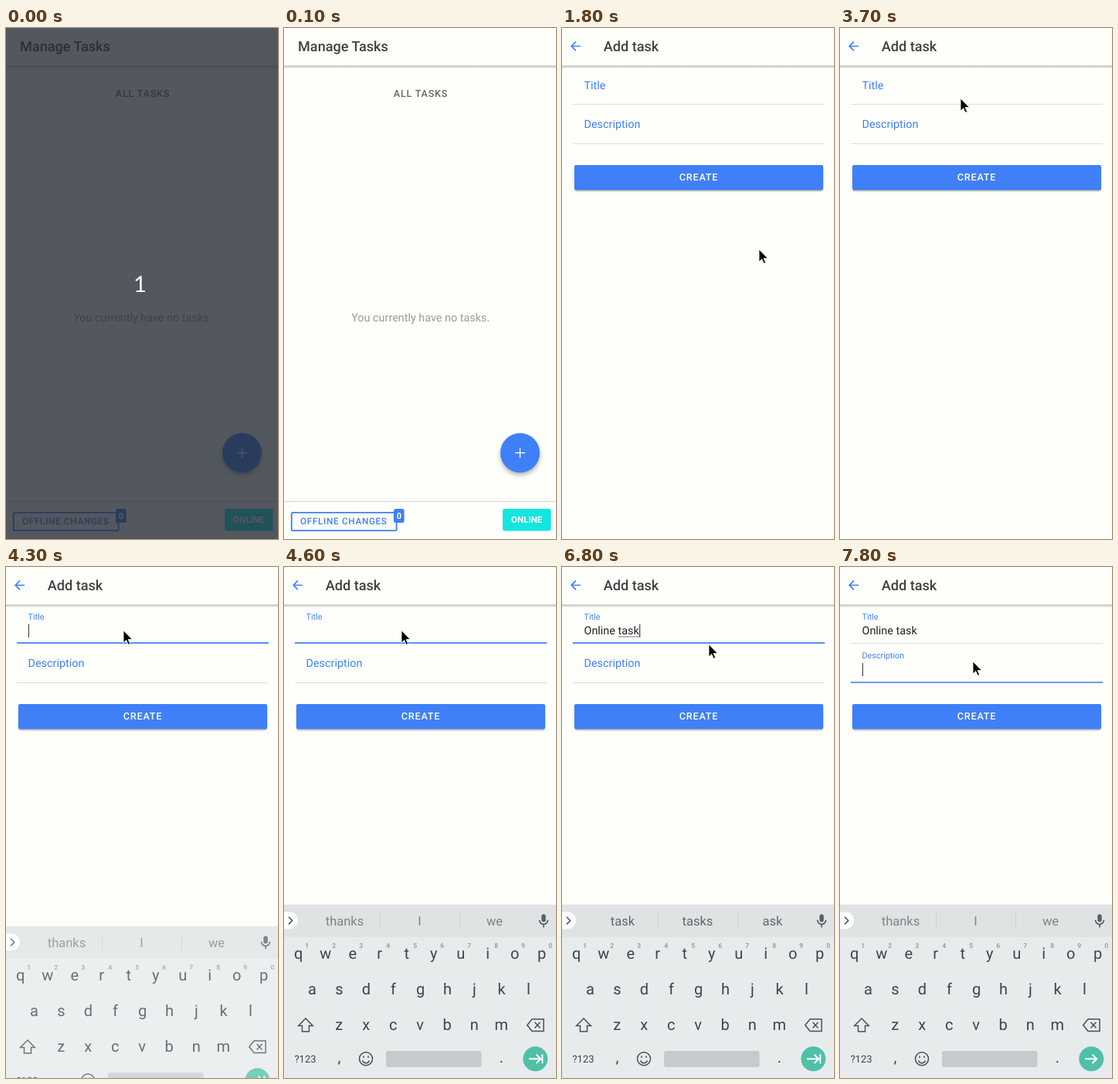
Recreate the animation shown at these times as an HTML page. Size 352x660 px, loop 8000 ms.

```html
<!DOCTYPE html>
<html lang="en">
<head>
<meta charset="utf-8">
<title>Manage Tasks</title>
<style>
  html, body { margin: 0; width: 100%; height: 100%; overflow: hidden; background: #fefffb; }
  svg { display: block; width: 352px; height: 660px; font-family: Roboto, sans-serif; text-rendering: geometricPrecision; }
  text { white-space: pre; }
  .mid { text-anchor: middle; }
  .blue { fill: #3f80f8; }
  .white { fill: #fff; }
  .line { fill: none; stroke: #3f80f8; }
  .heading { font-size: 18.1px; font-weight: 500; fill: #424242; }
  .caps { font-size: 12.6px; font-weight: 500; letter-spacing: .8px; }
  .field { font-size: 14.4px; }
  .icon { fill: none; stroke: #455157; stroke-width: 1.5; }
  .key { font-size: 20px; fill: #37474f; }
  .hint { font-size: 8.5px; font-weight: 500; fill: #8a9397; }
  .word { font-size: 16.5px; fill: #5c666a; }
  .idle .word { fill: #7d8487; }

  /* One loop is 8 s, so 100 ms is 1.25 %. */
  #cover, #form, #keyboard, #mouse, .label, .focus { animation: 8s step-end infinite; }
  #cover { animation-name: cover; }
  #form { animation-name: enter; }
  #keyboard { animation-name: rise; }
  #mouse { animation-name: point; }
  #title .label { animation-name: floatTitle; }
  #title .focus { animation-name: focusTitle; }
  #desc .label { animation-name: floatDesc; }
  #desc .focus { animation-name: focusDesc; }

  @keyframes cover { 0% { opacity: 1 } 1.25%, 100% { opacity: 0 } }
  @keyframes enter {
    0% { opacity: 0; transform: translateY(40px) }
    17.5% { opacity: .05; transform: translateY(38px) }
    18.75% { opacity: .45; transform: translateY(20px) }
    20% { opacity: .85; transform: translateY(5px) }
    21.25% { opacity: .98; transform: translateY(1px) }
    22.5%, 100% { opacity: 1; transform: none }
  }
  @keyframes rise {
    0% { opacity: 0; transform: translateY(224px) }
    52.5% { opacity: .4; transform: translateY(100px) }
    53.75% { opacity: .78; transform: translateY(28px) }
    55% { opacity: .95; transform: translateY(6px) }
    56.25%, 100% { opacity: 1; transform: none }
  }
  @keyframes floatTitle {
    0% { transform: none }
    50% { transform: translateY(-6px) scale(.87) }
    51.25%, 100% { transform: translateY(-11px) scale(.75) }
  }
  @keyframes floatDesc {
    0% { transform: none }
    91.25% { transform: translateY(-6px) scale(.87) }
    92.5%, 100% { transform: translateY(-11px) scale(.75) }
  }
  @keyframes focusTitle { 0%, 91.25%, 100% { opacity: 0 } 50% { opacity: 1 } }
  @keyframes focusDesc { 0% { opacity: 0 } 91.25%, 100% { opacity: 1 } }
  @keyframes point {
    0% { opacity: 0; transform: translate(309px, 432px) }
    3.75% { opacity: 1; transform: translate(309px, 432px) }
    5% { transform: translate(268px, 505px) }
    6.25% { transform: translate(235px, 565px) }
    7.5% { transform: translate(249px, 587px) }
    10% { transform: translate(258px, 580px) }
    11.25% { transform: translate(272px, 566px) }
    12.5% { transform: translate(284px, 553px) }
    15% { transform: translate(296px, 548px) }
    18.75% { transform: translate(292px, 520px) }
    20% { transform: translate(280px, 430px) }
    21.25% { transform: translate(265px, 330px) }
    22.5% { transform: translate(255px, 286px) }
    36.25% { transform: translate(290px, 235px) }
    37.5% { transform: translate(336px, 150px) }
    38.75% { transform: translate(318px, 60px) }
    40% { transform: translate(255px, 7px) }
    41.25% { transform: translate(200px, 20px) }
    42.5% { transform: translate(167px, 64px) }
    43.75% { transform: translate(156px, 97px) }
    46.25% { transform: translate(156px, 91px) }
    47.5% { transform: translate(152px, 82px) }
    85% { transform: translate(190px, 100px) }
    86.25% { transform: translate(212px, 118px) }
    88.75% { transform: translate(190px, 122px) }
    90%, 100% { opacity: 1; transform: translate(172px, 122px) }
  }
</style>
</head>
<body>
<svg viewBox="0 0 352 660">
  <defs>
    <linearGradient id="edge" x2="0" y2="1">
      <stop stop-color="#bbb"/><stop offset="1" stop-color="#bbb" stop-opacity="0"/>
    </linearGradient>
    <filter id="soft" x="-50%" y="-50%" width="200%" height="200%"><feGaussianBlur stdDeviation="3"/></filter>
    <filter id="tight" x="-5%" y="-20%" width="110%" height="150%"><feGaussianBlur stdDeviation="1"/></filter>
    <g id="bar">
      <rect width="352" height="660" fill="#fefffb"/>
      <rect y="48.5" width="352" height="4" fill="url(#edge)"/>
    </g>
  </defs>

  <g id="list">
    <use href="#bar"/>
    <text class="heading" x="18" y="29.5">Manage Tasks</text>
    <text class="caps mid" x="177" y="89" fill="#666">ALL TASKS</text>
    <text class="field mid" x="176.7" y="378.7" fill="#999">You currently have no tasks.</text>
    <circle cx="305.5" cy="552" r="25" opacity=".35" filter="url(#soft)"/>
    <circle class="blue" cx="305.5" cy="548.7" r="25.5"/>
    <path d="M299 548.7h13M305.5 542.2v13" stroke="#fff" stroke-width="1.3"/>
    <path d="M0 611.5h352" stroke="#dcdddb" stroke-width="1.6"/>
    <rect class="line" x="9.8" y="625.8" width="135.8" height="23.4" rx="2" stroke-width="1.8"/>
    <text class="blue" x="21" y="641" font-size="11.7" font-weight="500" letter-spacing=".7">OFFLINE CHANGES</text>
    <rect class="blue" x="142" y="621" width="13.6" height="18" rx="2.5"/>
    <text class="white mid" x="148.8" y="634" font-size="11" font-weight="700">0</text>
    <rect x="283" y="621" width="62.5" height="28.5" rx="3" fill="#12e6df"/>
    <text class="white mid" x="314.2" y="639" font-size="11.5" font-weight="700">ONLINE</text>
  </g>

  <g id="form">
    <use href="#bar"/>
    <path class="line" d="M24 23.5H12.5M18 17.7l-5.8 5.8 5.8 5.8" stroke-width="1.7"/>
    <text class="heading" x="53.7" y="29.5">Add task</text>
    <g id="title">
      <path d="M14 98.5h326" stroke="#dededc"/>
      <path class="line focus" d="M14 98.2h326" stroke-width="1.7"/>
      <g transform="translate(28.5 79)"><text class="field blue label">Title</text></g>
      <text id="typed" class="field" x="28.5" y="87" fill="#222"></text>
      <rect id="compose" y="89.5" height="1" fill="#777"/>
    </g>
    <g id="desc">
      <path d="M14 149.5h326" stroke="#dededc"/>
      <path class="line focus" d="M14 149h326" stroke-width="1.7"/>
      <g transform="translate(28.5 129.2)"><text class="field blue label">Description</text></g>
    </g>
    <rect id="caret" width="1.2" height="17" fill="#444"/>
    <rect x="16.5" y="179" width="321" height="31.5" rx="2" opacity=".4" filter="url(#tight)"/>
    <rect class="blue" x="16" y="177" width="322" height="32.3" rx="2"/>
    <text class="caps white mid" x="177" y="197">CREATE</text>
  </g>

  <g id="keyboard">
    <rect y="436" width="352" height="224" fill="#e7ebec"/>
    <rect y="436" width="352" height="42" fill="#dfe3e4"/>
    <path d="M124.5 446v22M227.5 446v22" stroke="#cdd2d4"/>
    <rect x="-12" y="445.5" width="30" height="22" rx="11" fill="#fff"/>
    <path class="icon" d="M6 452l4.7 4.7-4.7 4.7"/>
    <rect x="333.3" y="448.5" width="5.4" height="10" rx="2.7" fill="#566166"/>
    <path class="icon" d="M330.5 456a5.5 5.5 0 0 0 11 0M336 461.5v4"/>
    <g id="words">
      <text class="word mid" x="78.5" y="463"></text>
      <text class="word mid" x="175.5" y="463"></text>
      <text class="word mid" x="272.5" y="463"></text>
    </g>
    <g id="keys"></g>
    <path class="icon" d="M28 583l9.3 9.5h-4.8v7.5h-9v-7.5h-4.8z"/>
    <path class="icon" d="M321 584h15v15.500h-15l-6.300-7.750zM324.500 588l7 7.500m0-7.500l-7 7.500"/>
    <text class="mid" x="27.5" y="640" font-size="13" fill="#37474f">?123</text>
    <text class="key mid" x="71.5" y="640">,</text>
    <text class="key mid" x="281.5" y="640">.</text>
    <circle class="icon" cx="106" cy="635.3" r="8.5"/>
    <path class="icon" d="M101.500 637.500a4.800 4.800 0 0 0 9 0M103 631.500v2.500M109 631.500v2.500"/>
    <rect x="132" y="625" width="123.500" height="21" rx="3" fill="#c5cacd"/>
    <circle cx="325.300" cy="635.300" r="16" fill="#50c0a8"/>
    <g fill="none" stroke="#fff" stroke-width="2">
      <path d="M317 635.300h15M326.500 629.600l5.700 5.700-5.700 5.700"/>
      <path id="tab" d="M334.300 629.300v12"/>
    </g>
  </g>

  <path id="mouse" d="M0 0V16l3.7-3.500 2.500 5.700 2.400-1-2.500-5.600h5.200z" stroke="#fff" stroke-width=".8"/>

  <g id="cover">
    <rect width="352" height="660" fill="#262a35" opacity=".79"/>
    <text class="white mid" x="173.500" y="341.300" font-family="Lato, sans-serif" font-size="29">1</text>
  </g>
</svg>
<script>
const LOOP = 8000, LEFT = 28.5;
const $ = id => document.getElementById(id);

// Time, typed text, suggestions
const typing = [
  [0, '', 'thanks|I|we'],
  [4900, 'O', 'thanks|I|we'],
  [5000, 'O', 'Or|On|Oh'],
  [5100, 'On', 'Or|On|Oh'],
  [5200, 'On', 'On|One|Only'],
  [5300, 'Onl', 'Onl|Only|Online'],
  [5400, 'Onli', 'Onlin|Online|On-line'],
  [5500, 'Onlin', 'Onlin|Online|On-line'],
  [5600, 'Online', 'Onlin|Online|On-line'],
  [5700, 'Online', 'On|Online|One'],
  [5900, 'Online ', 'is|to|and'],
  [6100, 'Online t', 'to|the|it'],
  [6200, 'Online ta', 'ta|take|tax'],
  [6300, 'Online tas', 'tas|task|tax'],
  [6400, 'Online task', 'task|tasks|ask'],
  [7300, 'Online task', 'thanks|I|we']
];
const caretOn = [[4100, 4600], [4900, 6900], [7300, LOOP]];

function addText(cls, x, y, text) {
  const el = document.createElementNS('http://www.w3.org/2000/svg', 'text');
  el.setAttribute('class', cls + ' mid');
  el.setAttribute('x', x);
  el.setAttribute('y', y);
  el.textContent = text;
  $('keys').append(el);
}

[['qwertyuiop', 18.7, 506], ['asdfghjkl', 36.5, 551.5], ['zxcvbnm', 71.2, 597.5]].forEach(([row, x, y], r) =>
  [...row].forEach((key, i) => {
    addText('key', x + 35 * i, y, key);
    if (!r) addText('hint', x + 35 * i + 11, 492, (i + 1) % 10);
  }));

function render(t) {
  const [, text, words] = typing.findLast(step => step[0] <= t);
  const typed = $('typed'), inDesc = t >= 7300;
  typed.textContent = text;
  words.split('|').forEach((word, i) => $('words').children[i].textContent = word);
  $('words').classList.toggle('idle', words.startsWith('thanks'));

  const width = text ? typed.getComputedTextLength() : 0;
  const start = text.lastIndexOf(' ') + 1;
  const before = start ? typed.getSubStringLength(0, start) : 0;
  $('compose').setAttribute('x', LEFT + before);
  $('compose').setAttribute('width', inDesc ? 0 : Math.max(0, width - before));

  const caret = $('caret');
  caret.setAttribute('x', LEFT + (inDesc ? 0.3 : width + 0.3));
  caret.setAttribute('y', inDesc ? 124 : 74);
  caret.style.opacity = +caretOn.some(([from, to]) => t >= from && t < to);
  $('tab').style.opacity = +(t < 7400);
}

let origin;
function tick(now) {
  origin ??= now;
  render((now - origin) % LOOP);
  requestAnimationFrame(tick);
}
render(0);
requestAnimationFrame(tick);
</script>
</body>
</html>
```
